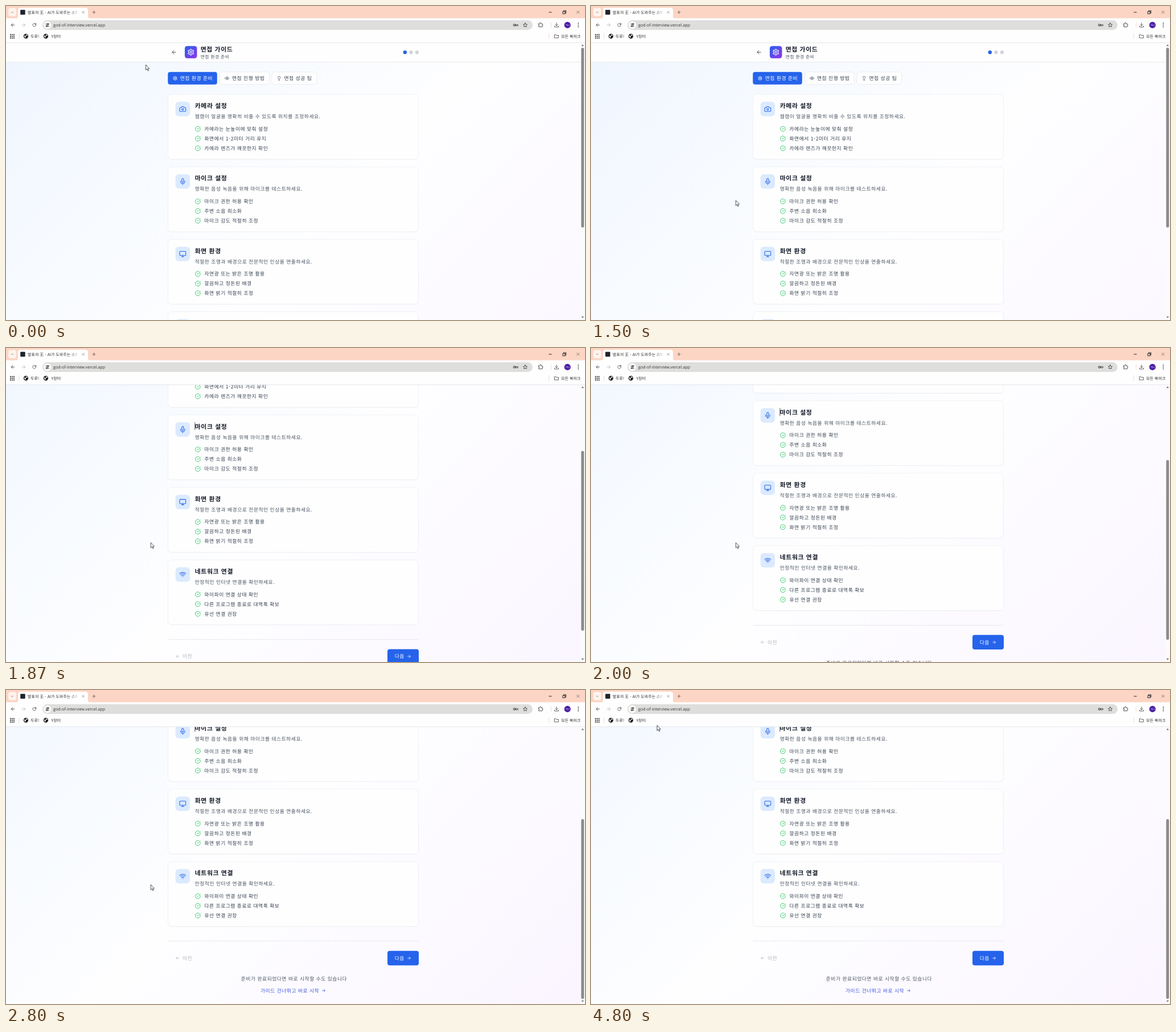
Animation of 1017 by 551 pixels, one loop 4830 ms. Source, as an HTML page:

```html
<!DOCTYPE html>
<html lang="ko">
<head>
<meta charset="utf-8">
<title>면접 가이드</title>
<style>
@property --y { syntax: '<number>'; inherits: true; initial-value: 0; }
html, body { margin: 0; width: 100%; height: 100%; overflow: hidden; background: #fff; }
svg { display: block; width: 100%; height: 100%; }
#stage { animation: scroll 4.83s infinite; }
#page { transform: translateY(calc(var(--y) * -1px)); }
#thumb { transform: translateY(calc(var(--y) * .65px)); }
#pointer { animation: point 4.83s infinite; }
#caret { animation: blink 4.83s step-end infinite; }

@keyframes scroll {
  0%, 31.6% { --y: 0; animation-timing-function: cubic-bezier(.35, .1, .7, .8); }
  34.5% { --y: 85.2; animation-timing-function: cubic-bezier(.25, .4, .6, .86); }
  41.4% { --y: 189.5; animation-timing-function: cubic-bezier(.3, .5, .6, .85); }
  48.2% { --y: 217.5; animation-timing-function: cubic-bezier(.3, .4, .6, 1); }
  55%, 100% { --y: 235.5; }
}
@keyframes point {
  0% { transform: translate(245.5px, 103px); animation-timing-function: ease-in-out; }
  20%, 31% { transform: translate(254.3px, 341px); }
  48%, 77.2% { transform: translate(254.3px, 341.5px); animation-timing-function: ease-in-out; }
  98%, 100% { transform: translate(116px, 62px); }
}
@keyframes blink {
  0% { opacity: 0; } 10.4% { opacity: 1; } 21.3% { opacity: 0; }
  32.3% { opacity: 1; } 43.3% { opacity: 0; } 54.2% { opacity: 1; }
  65.2% { opacity: 0; } 76.2% { opacity: 1; } 87.2% { opacity: 0; }
  97.7%, 100% { opacity: 1; }
}

text {
  font: 8.8px "Noto Sans CJK KR", "Noto Sans CJK", sans-serif;
  letter-spacing: .055em; fill: #374151; text-rendering: geometricPrecision; white-space: pre;
}
.title { font-size: 10.9px; font-weight: 700; fill: #111827; }
.sub { font-size: 7.75px; fill: #4b5563; }
.desc { fill: #4b5563; }
.white { fill: #fff; }
.dim { fill: #b0b4bb; }
.link { fill: #3f55d8; }
.ui { font-size: 7px; letter-spacing: 0; fill: #2b2b2b; }
.url { font: 7.23px "Open Sans", sans-serif; letter-spacing: 0; fill: #333; }
.tiny { font-size: 4px; letter-spacing: 0; fill: #fff; }
.icon { fill: none; stroke-width: 2; stroke-linecap: round; stroke-linejoin: round; }
.line { fill: none; stroke: #333; stroke-width: 1.1; }
</style>
</head>
<body>
<svg id="stage" viewBox="0 0 1017 551" preserveAspectRatio="none">
  <defs>
    <linearGradient id="sky" gradientUnits="userSpaceOnUse" x1="72" y1="-7" x2="937" y2="858">
      <stop offset="0" stop-color="#eff6ff"/><stop offset=".5" stop-color="#fefeff"/><stop offset="1" stop-color="#faf5ff"/>
    </linearGradient>
    <linearGradient id="badge" x2="1" y2="1">
      <stop offset="0" stop-color="#2563eb"/><stop offset="1" stop-color="#9333ea"/>
    </linearGradient>
    <linearGradient id="fade">
      <stop offset="0" stop-color="#fff" stop-opacity="0"/><stop offset="1" stop-color="#fff"/>
    </linearGradient>
  </defs>
  <g id="page"></g>
  <g id="browser"></g>
  <path id="pointer" d="M0 0V9.2L2.1 7.3 3.6 10.6 5 10 3.5 6.8H6.3Z" fill="#fff" stroke="#222" stroke-width=".8" stroke-linejoin="round"/>
</svg>
<script>
const BLUE = '#2563eb', INK = '#374151', DARK = '#333';

const tooth = 'M8.35 6.16l.43-.25a2 2 0 0 0 1-1.73V4a2 2 0 0 1 2-2h.44a2 2 0 0 1 2 2v.18a2 2 0 0 0 1 1.73';
const icons = {
  gear: [0, 60, 120, 180, 240, 300].map(a => `<path d="${tooth}" transform="rotate(${a} 12 12)"/>`).join('')
    + '<circle cx="12" cy="12" r="3"/>',
  camera: '<path d="M14.5 4h-5L7 7H4a2 2 0 0 0-2 2v9a2 2 0 0 0 2 2h16a2 2 0 0 0 2-2V9a2 2 0 0 0-2-2h-3z"/><circle cx="12" cy="13" r="3"/>',
  mic: '<path d="M12 2a3 3 0 0 0-3 3v7a3 3 0 0 0 6 0V5a3 3 0 0 0-3-3zM19 10v2a7 7 0 0 1-14 0v-2M12 19v3"/>',
  monitor: '<rect x="2" y="3" width="20" height="14" rx="2"/><path d="M8 21h8M12 17v4"/>',
  wifi: '<path d="M12 20h.01M2 8.82a15 15 0 0 1 20 0M5 12.86a10 10 0 0 1 14 0M8.5 16.43a5 5 0 0 1 7 0"/>',
  eye: '<path d="M2 12s3-7 10-7 10 7 10 7-3 7-10 7-10-7-10-7z"/><circle cx="12" cy="12" r="3"/>',
  bulb: '<path d="M15 14c.2-1 .7-1.7 1.5-2.5 1-.9 1.5-2.2 1.5-3.5A6 6 0 0 0 6 8c0 1 .2 2.2 1.5 3.5.7.7 1.3 1.5 1.5 2.5M9 18h6M10 22h4"/>',
  check: '<path d="M21.8 10A10 10 0 1 1 17 3.34M9 11l3 3L22 4"/>',
  left: '<path d="M12 19l-7-7 7-7M19 12H5"/>',
  right: '<path d="M12 5l7 7-7 7M5 12h14"/>',
  reload: '<path d="M20 12a8 8 0 1 1-2.5-5.8L20 9M20 3v6h-6"/>',
  star: '<path d="M12 3l2.7 6 6.3.7-4.700 4.300 1.300 6.500L12 17.200 6.400 20.500l1.300-6.500L3 9.700 9.300 9z"/>',
  puzzle: '<path d="M4 7h5V5a2 2 0 0 1 5 0v2h5v5h1a2 2 0 0 1 0 4h-1v5H4v-5h1a2 2 0 0 0 0-4H4z"/>',
  download: '<path d="M12 3v12M6.500 10l5.500 5.500L17.500 10M3 17v4h18v-4"/>',
  folder: '<path d="M3 5h6l2 3h10v12H3z"/>',
  key: '<circle cx="7" cy="12" r="5"/><circle cx="7" cy="12" r="1"/><path d="M12 10h11v4h-3v2h-4v-2h-4"/>',
  down: '<path d="M5 9l7 7 7-7"/>',
  cross: '<path d="M4 4l16 16M20 4L4 20"/>',
  plus: '<path d="M12 3v18M3 12h18"/>'
};

// Icons and text are placed by their vertical middle.
const icon = (name, cx, cy, size, color = DARK) =>
  `<g class="icon" stroke="${color}" transform="translate(${cx - size / 2} ${cy - size / 2}) scale(${size / 24})">${icons[name]}</g>`;
const text = (x, cy, str, cls = '') => `<text class="${cls}" x="${x}" y="${cy}" dy=".375em">${str}</text>`;
const box = (x, y, w, h, r, fill, extra = '') =>
  `<rect x="${x}" y="${y}" width="${w}" height="${h}" rx="${r}" fill="${fill}" ${extra}/>`;
const dot = (x, y, r, fill) => `<circle cx="${x}" cy="${y}" r="${r}" fill="${fill}"/>`;
const line = d => `<path class="line" d="${d}"/>`;
const edge = (color, w = .7) => `stroke="${color}" stroke-width="${w}"`;

const cards = [
  ['camera', '카메라 설정', '웹캠이 얼굴을 명확히 비출 수 있도록 위치를 조정하세요.',
    '카메라는 눈높이에 맞춰 설정', '화면에서 1-2미터 거리 유지', '카메라 렌즈가 깨끗한지 확인'],
  ['mic', '마이크 설정', '명확한 음성 녹음을 위해 마이크를 테스트하세요.',
    '마이크 권한 허용 확인', '주변 소음 최소화', '마이크 감도 적절히 조정'],
  ['monitor', '화면 환경', '적절한 조명과 배경으로 전문적인 인상을 연출하세요.',
    '자연광 또는 밝은 조명 활용', '깔끔하고 정돈된 배경', '화면 밝기 적절히 조정'],
  ['wifi', '네트워크 연결', '안정적인 인터넷 연결을 확인하세요.',
    '와이파이 연결 상태 확인', '다른 프로그램 종료로 대역폭 확보', '유선 연결 권장']
];

const card = ([name, title, desc, ...items], i) => `<g transform="translate(0 ${i * 127.2})">`
  + box(284.5, 155.6, 440, 114, 6.5, '#e6e9ef', 'opacity=".6"')
  + box(284.5, 155, 440, 113.8, 6.500, '#fefefe', edge('#eaedf3'))
  + box(297.7, 168, 25.4, 25.4, 6, '#dbeafe')
  + icon(name, 310.4, 180.8, 12.7, BLUE)
  + text(331.7, 175.2, title, 'title') + text(331.7, 194, desc, 'desc')
  + items.map((s, k) => icon('check', 337, 215.6 + k * 17, 10.6, '#22c55e') + text(348.500, 215.6 + k * 17, s)).join('')
  + '</g>';

const tab = (x, w, name, label, on) =>
  box(x, 115.700, w, 22, 4, on ? BLUE : '#fefefe', on ? '' : edge('#e5e7eb'))
  + icon(name, x + 12.700, 126.800, 8.5, on ? '#fff' : INK)
  + text(x + 21.5, 126.800, label, on ? 'white' : '');

page.innerHTML = box(0, 64, 1009, 723, 0, 'url(#sky)')
  + box(0, 64, 1009, 34.500, 0, '#fefefe') + box(0, 98, 1009, .8, 0, '#e5e7eb')
  + icon('left', 295, 81.200, 10.6, INK)
  + box(314, 70.3, 21.5, 21.5, 4.2, 'url(#badge)') + icon('gear', 324.7, 81, 12.7, '#fff')
  + text(341.700, 75.6, '면접 가이드', 'title') + text(341.7, 88.700, '면접 환경 준비', 'sub')
  + dot(700.8, 81.2, 3.2, BLUE) + dot(711.400, 81.2, 3.2, '#d1d5db') + dot(721.9, 81.2, 3.2, '#d1d5db')
  + tab(284.3, 86.500, 'gear', '면접 환경 준비', true)
  + tab(375.5, 87, 'eye', '면접 진행 방법')
  + tab(467, 78.700, 'bulb', '면접 성공 팁')
  + cards.map(card).join('')
  + box(331.5, 295.3, .8, 13.5, 0, '#222', 'id="caret"')
  + box(284.3, 675.8, 440.5, .8, 0, '#e2e5ea')
  + icon('left', 301.300, 706, 8.5, '#b0b4bb') + text(310, 706, '이전', 'dim')
  + box(670, 693.3, 55, 25.400, 4, BLUE) + text(682.700, 706, '다음', 'white') + icon('right', 708, 706, 8.5, '#fff')
  + text(412.8, 742, '준비가 완료되었다면 바로 시작할 수도 있습니다', 'desc')
  + text(447, 763, '가이드 건너뛰고 바로 시작', 'link') + icon('right', 558, 763, 8.5, '#3f55d8');

const globe = x => dot(x, 53, 4.2, '#222')
  + `<path d="M${x - 3.4} 51.500l2.800 1 .6 1.600-1.500 1.800zM${x + .5} 49.700l-.8 1.800 2 .8 1.800-.900z" fill="#fff"/>`;
const grid = [0, 3, 6].map(a => [0, 3, 6].map(b => box(7 + a, 49.300 + b, 2, 2, .3, '#444')).join('')).join('');

browser.innerHTML = box(0, 0, 1017, 22, 0, '#fcd5c5')
  + box(4, 3.500, 14, 14.500, 4, '#fff3ec') + icon('down', 11, 11, 6)
  + '<path d="M17 22q4 0 4-4V7.500q0-4.500 4.500-4.500h114q4.500 0 4.500 4.500V18q0 4 4 4z" fill="#fff"/>'
  + box(25.200, 6.700, 8.500, 8.500, 1, '#20232a')
  + text(38, 11, '발표의 王 - AI가 도와주는 스마', 'ui')
  + box(116, 5, 11, 13, 0, 'url(#fade)') + box(127, 5, 5, 13, 0, '#fff')
  + icon('cross', 135.700, 11, 5.500) + icon('plus', 154.500, 11, 7)
  + line('M953.500 11h5') + line('M978 9.800h4v4h-4zM979.500 9.500v-1.300h4v4h-1.200') + icon('cross', 1004.700, 10.800, 6.500)
  + box(0, 21.500, 1017, 43, 0, '#fefefe') + box(0, 64, 1017, .8, 0, '#dfe3e8')
  + icon('left', 12, 33.300, 9.500) + icon('right', 31, 33.300, 9.500, '#b5b5b5') + icon('reload', 49.700, 33.300, 8.500)
  + box(64, 25, 861, 17, 8.500, '#dedfdc') + dot(72.700, 33.500, 6.600, '#fefefe')
  + line('M69.500 31.700h2.500M75 31.700h1M69.500 35.300h1M73.500 35.300h2.500')
  + '<g class="line"><circle cx="73.600" cy="31.700" r="1.200"/><circle cx="71.900" cy="35.300" r="1.200"/></g>'
  + text(83, 33.200, 'god-of-interview.vercel.app', 'url')
  + icon('key', 895, 33.500, 9.500) + icon('star', 912, 33.300, 9.500) + icon('puzzle', 939, 33, 9.800)
  + box(957, 28.500, .7, 9.500, 0, '#f0cfc0') + icon('download', 967, 33.300, 9.500)
  + dot(986.200, 33.400, 5.600, '#4a1fa5') + text(982.500, 33.400, '가나', 'tiny')
  + [30.200, 33.400, 36.600].map(y => dot(1005.300, y, .9, DARK)).join('')
  + grid + box(22.700, 48, .7, 10, 0, '#f0cfc0')
  + globe(35) + text(43, 53, '두루!', 'ui') + globe(70) + text(79.500, 53, 'Y장터', 'ui')
  + box(953, 48, .7, 10, 0, '#f0cfc0') + icon('folder', 967, 53, 9) + text(975, 53, '모든 북마크', 'ui')
  + box(1009, 64.800, 8, 486.200, 0, '#fbfbfb')
  + '<path d="M1010.500 70.200l2.300-3 2.300 3zM1010.500 544.700l2.300 3 2.300-3z" fill="#777"/>'
  + box(1010.300, 73.300, 5, 315.500, 2.500, '#8b8b8b', 'id="thumb"');
</script>
</body>
</html>
```
